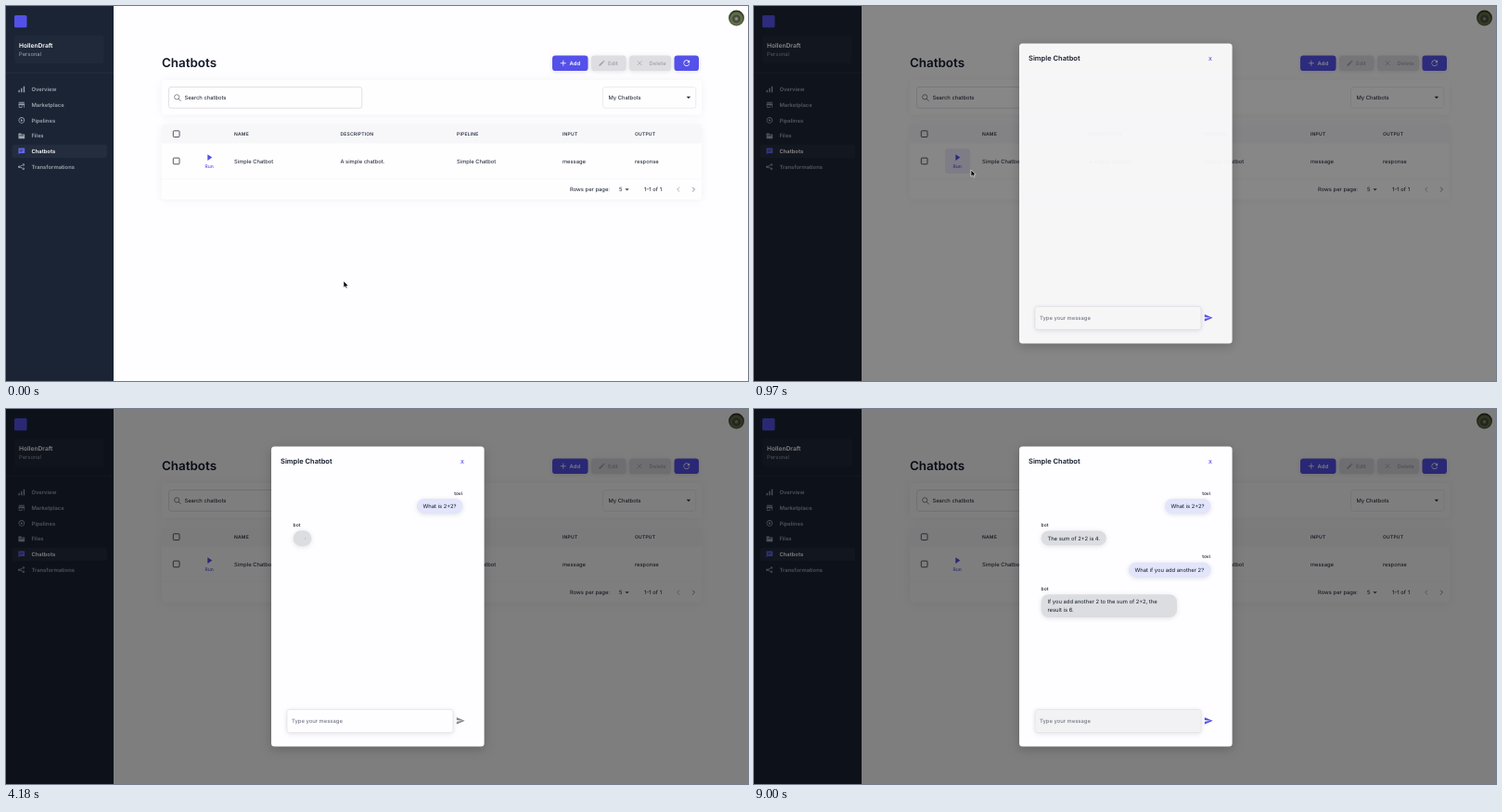
Animation, 800 px wide and 405 px high, one loop 9760 ms. Source, as an HTML page:

```html
<!DOCTYPE html>
<html lang="en">
<head>
<meta charset="utf-8">
<title>Chatbots</title>
<style>
  html, body { margin: 0; width: 100%; height: 100%; overflow: hidden; background: #fefdff; }
  svg { display: block; width: 100%; height: 100%; }
  text { font: 400 5.85px Inter, sans-serif; fill: #111927; white-space: pre; text-rendering: geometricPrecision; }
  .semi { font-weight: 600; }
  .head { font-size: 5px; font-weight: 600; letter-spacing: .2px; fill: #2f3746; }
  .name { font-size: 5px; font-weight: 500; }
  .end { text-anchor: end; }
  .mid { text-anchor: middle; }
  .card { fill: #fffeff; filter: drop-shadow(0 1.5px 4px #0000000d); }
  .line { fill: none; stroke: #e4e5ea; stroke-width: .7; }
  .soft { filter: drop-shadow(0 1.5px 2.5px #0000001c); }
</style>
</head>
<body>
<svg viewBox="0 0 800 405">
  <defs>
    <radialGradient id="avatar" cx=".5" cy=".55">
      <stop offset="0" stop-color="#a9a698"/>
      <stop offset=".35" stop-color="#3d4235"/>
      <stop offset=".7" stop-color="#67794a"/>
      <stop offset="1" stop-color="#2c3123"/>
    </radialGradient>
  </defs>
  <g id="page"></g>
  <g id="hover">
    <rect x="206" y="154" width="27" height="27" rx="3" fill="#5450ea" fill-opacity=".1"/>
    <circle id="ripple" cx="224" cy="170" fill="#5450ea"/>
  </g>
  <rect id="shade" width="800" height="405"/>
  <g id="modal">
    <rect x="286" y="40.5" width="229.6" height="324" rx="3.5" fill="#fefdff" style="filter:drop-shadow(0 3px 6px #0003)"/>
    <text x="296" y="59.4" class="semi" style="font-size:7.5px">Simple Chatbot</text>
    <text x="492" y="58.8" class="semi mid" style="font-size:5.4px;fill:#5450ea">X</text>
    <g id="chat"></g>
    <rect id="field" x="303" y="324.5" width="179" height="25" rx="3" class="soft"/>
    <text id="label">Type your message</text>
    <text id="typed" x="308.4" y="342.8"></text>
    <rect id="caret" y="336.8" width=".7" height="8" fill="#111927"/>
    <path id="send" transform="translate(485 331.8) scale(.417)" d="M2 21 23 12 2 3V10L17 12 2 14Z"/>
  </g>
  <path id="cursor" d="M0 0V7.2L1.7 5.7 2.8 8.1 4 7.5 2.9 5.2H5.2Z" fill="#000" stroke="#fff" stroke-width=".6"/>
</svg>
<script>
const LOOP = 9760, BLUE = '#5450ea', MUTED = '#9da4ae';
const $ = id => document.getElementById(id);
const set = (id, attrs) => { for (const k in attrs) $(id).setAttribute(k, attrs[k]); };

const text = (x, y, str, cls = '', style = '') =>
  `<text x="${x}" y="${y}" class="${cls}" style="${style}">${str}</text>`;
const box = (x, y, w, h, rx, attrs) =>
  `<rect x="${x}" y="${y}" width="${w}" height="${h}" rx="${rx}" ${attrs}/>`;
const path = (d, color, width = .8) =>
  `<path d="${d}" fill="none" stroke="${color}" stroke-width="${width}"/>`;
// Icons are drawn on a 24-unit grid.
const icon = (x, y, size, d, color) =>
  `<path transform="translate(${x} ${y}) scale(${size / 24})" d="${d}" fill="${color}" fill-rule="evenodd"/>`;

const ICONS = {
  Overview: 'M2 14h4v8H2zM10 8h4v14h-4zM18 2h4v20h-4z',
  Marketplace: 'M3 3h18v3H3zM2 8h20v5h-1v8h-2v-8h-5v8H3v-8H2zM5 13v6h7v-6z',
  Pipelines: 'M12 2a10 10 0 1 0 .1 0ZM12 4.5a7.5 7.5 0 1 1-.1 0ZM9.5 7.5l7 4.5-7 4.5z',
  Files: 'M2 4h8l2 3h10v14H2zM5 10v2h14v-2z',
  Chatbots: 'M2 2h20v16H6l-4 4zM6 6v2h12V6zM6 11v2h8v-2z',
  Transformations: 'M4 9a3.5 3.5 0 1 0 .1 0ZM18 2a3.5 3.5 0 1 0 .1 0ZM18 15a3.5 3.5 0 1 0 .1 0ZM5 11 17 4l1 2L6 13zM6 11l12 7-1 2L5 13z'
};
const PENCIL = 'M3 17.2V21h3.8L17.8 9.9l-3.7-3.7zM20.7 7a1 1 0 0 0 0-1.4l-2.3-2.3a1 1 0 0 0-1.4 0l-1.9 1.8 3.8 3.8z';
const REFRESH = 'M17.7 6.4A8 8 0 1 0 19.7 14h-2.1A6 6 0 1 1 16.2 7.8L13 11h7V4z';

function sidebar() {
  const items = Object.keys(ICONS).map((name, i) => {
    const y = 90 + i * 16.72, active = name === 'Chatbots';
    return (active ? box(6.5, y - 7.2, 102.5, 14.4, 3, 'fill="#fff" fill-opacity=".04"') : '') +
      icon(12.8, y - 4, 8, ICONS[name], active ? '#6366f1' : MUTED) +
      text(27.4, y + 2.1, name, 'semi', `fill:${active ? '#fff' : MUTED}`);
  });
  return box(0, 0, 116, 405, 0, 'fill="#1b2435"') +
    box(9, 10, 13.5, 13.2, 1.5, `fill="${BLUE}"`) +
    box(9, 32, 96.5, 30, 3, 'fill="#fff" fill-opacity=".025"') +
    text(14, 45.1, 'HollenDraft', 'semi', 'font-size:6.67px;fill:#fff') +
    text(14, 54.4, 'Personal', '', `fill:${MUTED}`) +
    box(0, 71.8, 116, .5, 0, 'fill="#2f3746"') + items.join('');
}

function button(x, w, label, color, bg, labelX) {
  return box(x, 53.4, w, 16.7, 3.4, `fill="${bg}" class="soft"`) +
    text(labelX, 63.8, label, 'semi', `fill:${color}`);
}

function page() {
  const off = '#a4a6ab', offBg = '#dedee2';
  const columns = [[246, 'NAME', 'Simple Chatbot'], [360.4, 'DESCRIPTION', 'A simple chatbot.'],
    [486, 'PIPELINE', 'Simple Chatbot'], [600, 'INPUT', 'message'], [678, 'OUTPUT', 'response']];
  const checkbox = y => box(180.3, y - 3.3, 6.7, 6.7, .9, 'fill="none" stroke="#3d4350" stroke-width=".9"');
  return sidebar() +
    '<circle cx="787.5" cy="13" r="8.4" fill="url(#avatar)"/>' +
    text(168, 66.4, 'Chatbots', 'semi', 'font-size:13.4px') +
    button(589, 38.5, 'Add', '#fff', BLUE, 607.6) +
    button(631, 37.5, 'Edit', off, offBg, 649) +
    button(672, 45, 'Delete', off, offBg, 693.5) +
    button(720.5, 26.5, '', '#fff', BLUE, 0) +
    path('M597.8 61.7h6M600.8 58.7v6', '#fff') +
    icon(638.3, 57.5, 8.3, PENCIL, off) +
    path('M680.8 59.4l4.6 4.6M685.4 59.4l-4.6 4.6', off) +
    icon(728.8, 56.7, 10, REFRESH, '#fff') +
    box(168, 80, 582, 37.5, 3.5, 'class="card"') +
    box(175.5, 87.5, 208.3, 22.8, 2.5, 'class="line" style="stroke:#d3d5da"') +
    '<circle cx="184.2" cy="98.3" r="2.6" fill="none" stroke="#555c69" stroke-width=".7"/>' +
    path('M186 100.2l2.5 2.5', '#555c69') +
    text(192.4, 101, 'Search chatbots') +
    box(643.5, 87.5, 100.3, 22.8, 2.5, 'class="line"') +
    text(649.5, 101, 'My Chatbots') +
    '<path d="M733.6 97.7h4.6l-2.3 2.4z" fill="#22262f"/>' +
    box(168, 128, 582, 81, 3.5, 'class="card"') +
    box(168, 128, 582, 20.4, 2, 'fill="#f7f7fa"') +
    box(168, 186.6, 582, .5, 0, 'fill="#eeeff3"') +
    checkbox(138.1) + checkbox(167.4) +
    columns.map(([x, head, cell]) => text(x, 139.9, head, 'head') + text(x, 169.6, cell)).join('') +
    `<path d="M217.3 160.3v6.6l5-3.3z" fill="${BLUE}"/>` +
    text(219.1, 174.6, 'Run', 'mid', `font-size:5px;font-weight:500;fill:${BLUE}`) +
    text(608, 200.2, 'Rows per page:') + text(661, 200.2, '5') +
    '<path d="M667.4 197.3h4.4l-2.2 2.3z" fill="#444a55"/>' +
    text(688, 200.2, '1–1 of 1') +
    path('M726.1 195.7l-2.4 2.4 2.4 2.4', '#9a9ca3') +
    path('M740.1 195.7l2.4 2.4-2.4 2.4', '#666c78');
}

// One question and its reply, or a spinner while the reply is pending.
function exchange(id, dy, question, questionX, reply, replyWidth) {
  return `<g id="${id}" transform="translate(0 ${dy})">` +
    text(492, 92.8, 'tovi', 'name end') +
    box(questionX, 97, 492.5 - questionX, 16.2, 8, 'fill="#e2e5fb" class="soft"') +
    text(questionX + 6.6, 107.2, question) +
    text(309.6, 127, 'bot', 'name') +
    `<g id="${id}Wait">` + box(309.6, 131.3, 19.8, 17, 8.5, 'fill="#dcdde1" class="soft"') +
    `<circle id="${id}Spin" cx="319.5" cy="139.6" r="3.2" fill="none" stroke="${BLUE}" stroke-width=".75"/></g>` +
    `<g id="${id}Reply">` +
    box(309.6, 131.5, replyWidth, 15.8 + 9 * (reply.length - 1), 8, 'fill="#dcdde1" class="soft"') +
    reply.map((line, i) => text(316.4, 141.5 + 9 * i, line)).join('') + '</g></g>';
}

const rounds = [
  { id: 'first', question: 'What is 2+2?', focus: 1620, type: 1750, send: 3040, answer: 4370 },
  { id: 'second', question: 'What if you add another 2?', focus: 4985, type: 5200, send: 7000, answer: 8660 }
];
const KEY_MS = 50, BLINK_MS = 250;

$('page').innerHTML = page();
$('chat').innerHTML =
  exchange('first', 0, rounds[0].question, 443, ['The sum of 2+2 is 4.'], 70.2) +
  exchange('second', 68.7, rounds[1].question, 404,
    ['If you add another 2 to the sum of 2+2, the', 'result is 6.'], 146.4);

const ramp = (t, a, b) => { const p = Math.min(1, Math.max(0, (t - a) / (b - a))); return p * p * (3 - 2 * p); };
const show = (id, on) => { $(id).style.display = on ? '' : 'none'; };

// Time, x, y of the pointer tip.
const pointerPath = [[0, 364, 297], [90, 364, 297], [760, 226, 169.5], [915, 226, 169.5], [970, 234, 177], [1450, 345, 337]];

function drawPointer(t) {
  let [, x, y] = pointerPath[0];
  for (let i = 1; i < pointerPath.length; i++) {
    const [t0, x0, y0] = pointerPath[i - 1], [t1, x1, y1] = pointerPath[i];
    const p = ramp(t, t0, t1);
    x += (x1 - x0) * p;
    y += (y1 - y0) * p;
  }
  set('cursor', { transform: `translate(${x} ${y})` });
  show('cursor', t < rounds[0].type);
  show('hover', t > 720 && t < 1020);
  set('ripple', { r: 3 + 6 * ramp(t, 820, 900), 'fill-opacity': .2 * ramp(t, 810, 840) * (1 - ramp(t, 915, 975)) });
}

function drawSpinner(id, t) {
  const phase = t / 700 % 1, sweep = 10 + 255 * Math.sin(Math.PI * phase) ** 2;
  const unit = 2 * Math.PI * 3.2 / 360;
  set(id, {
    'stroke-dasharray': `${sweep * unit} ${360 * unit}`,
    transform: `rotate(${phase * 720 + 20} 319.5 139.6)`
  });
}

function drawField(t) {
  const round = rounds.find(r => t >= r.focus && t < r.send);
  const waiting = rounds.some(r => t >= r.send && t < r.answer);
  const float = rounds.reduce((sum, r) => sum + ramp(t, r.focus, r.focus + 100) - ramp(t, r.send, r.send + 60), 0);
  set('field', {
    fill: t >= rounds[1].send ? '#f2f2f4' : '#fefdff',
    stroke: round ? BLUE : '#dfe0e5',
    'stroke-width': round ? 1.4 : .6
  });
  set('label', {
    transform: `translate(308 ${338.7 - 6 * float}) scale(${1 - .15 * float})`,
    style: `font-weight:500;fill:${round ? BLUE : '#747a86'}`
  });
  set('send', { fill: waiting ? '#85878d' : BLUE });
  show('caret', false);
  $('typed').textContent = '';
  if (!round) return;

  const count = Math.max(0, Math.floor((t - round.type) / KEY_MS));
  $('typed').textContent = round.question.slice(0, count);
  const idle = t - round.type - KEY_MS * round.question.length;
  show('caret', idle < 0 || Math.floor(idle / BLINK_MS) % 2 === 0);
  set('caret', { x: 308.6 + $('typed').getComputedTextLength() });
}

function draw() {
  const t = performance.now() % LOOP;
  const open = ramp(t, 890, 985);
  set('shade', { opacity: open * .5 });
  set('modal', { opacity: open });
  drawPointer(t);
  drawField(t);
  for (const { id, send, answer } of rounds) {
    show(id, t >= send);
    show(id + 'Wait', t < answer);
    show(id + 'Reply', t >= answer);
    drawSpinner(id + 'Spin', t);
  }
  requestAnimationFrame(draw);
}
draw();
</script>
</body>
</html>
```
